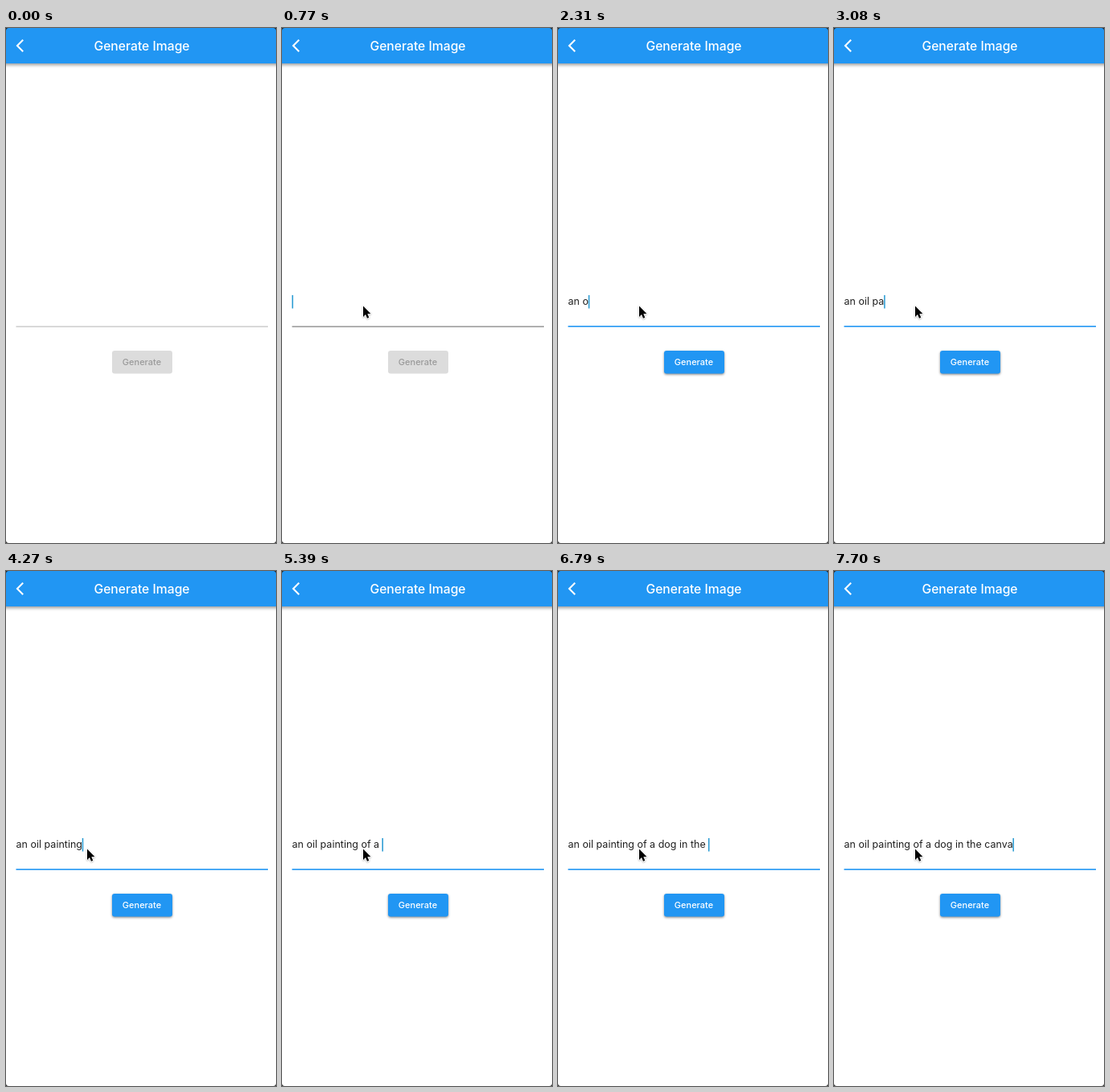
Write an HTML page with a canvas that moves like this. It is 336x640 px and loops after 8000 ms.

```html
<!DOCTYPE html>
<html lang="en">
<head>
<meta charset="utf-8">
<title>Generate Image</title>
<style>
html, body { margin: 0; width: 100%; height: 100%; overflow: hidden; background: #fff; }
canvas { display: block; width: 336px; height: 640px; }
</style>
</head>
<body>
<canvas id="stage"></canvas>
<script>
const W = 336, H = 640, LOOP = 8000, TICK = 70;
const BLUE = [33, 150, 243];
const FONT = 'Inter, Roboto, sans-serif';
const PROMPT = 'an oil painting of a dog in the canva';
const KEYS = [
  1540, 1820, 1960,
  2310, 2450, 2590, 2730, 2940, 3080,
  3640, 3780, 3850, 3990, 4130, 4270, 4410, 4550,
  5040, 5180, 5320, 5390,
  5670, 5810, 5950, 6020, 6160, 6300,
  6440, 6510, 6650, 6720, 6790,
  7140, 7210, 7350, 7630, 7700
];
const ARROW = [[0, 0], [0, 13.4], [3, 10.6], [5, 15.3], [7.3, 14.3], [5.3, 9.8], [9.4, 9.5]];

const canvas = document.getElementById('stage');
const ctx = canvas.getContext('2d');
const dpr = window.devicePixelRatio || 1;
canvas.width = W * dpr;
canvas.height = H * dpr;

const clamp = x => Math.max(0, Math.min(1, x));
const ramp = (t, from, span) => clamp((t - from) / span);
const lerp = (a, b, k) => a + (b - a) * k;
const mix = (a, b, k) => `rgb(${a.map((v, i) => Math.round(lerp(v, b[i], k))).join()})`;

function label(str, x, y, size, weight, color, align = 'left') {
  ctx.font = `${weight} ${size}px ${FONT}`;
  ctx.textAlign = align;
  ctx.fillStyle = color;
  ctx.fillText(str, x, y);
}

function withShadow(alpha, blur, dy, draw) {
  ctx.save();
  ctx.shadowColor = `rgba(0,0,0,${alpha})`;
  ctx.shadowBlur = blur * dpr;
  ctx.shadowOffsetY = dy * dpr;
  draw();
  ctx.restore();
}

function header() {
  ctx.fillStyle = mix(BLUE, BLUE, 0);
  withShadow(0.4, 4, 1.5, () => ctx.fillRect(-8, -8, W + 16, 52));
  ctx.strokeStyle = '#fff';
  ctx.lineWidth = 2.1;
  ctx.beginPath();
  ctx.moveTo(21.2, 14.8);
  ctx.lineTo(14, 22);
  ctx.lineTo(21.2, 29.2);
  ctx.stroke();
  label('Generate Image', 169, 27.5, 15.7, 500, '#fff', 'center');
}

function field(t) {
  const hover = ramp(t, 280, 140), focus = ramp(t, 770, 140);
  const idle = [186, 186, 186], dark = [112, 112, 112];
  ctx.fillStyle = focus ? mix(dark, BLUE, focus) : mix(idle, dark, hover);
  const thick = lerp(1.1, 1.6, focus);
  ctx.fillRect(12.5, 371.6 - thick, 313.5, thick);

  const typed = PROMPT.slice(0, KEYS.filter(k => k <= t).length);
  label(typed, 12.6, 344, 12.5, 400, '#222');
  const shown = t >= KEYS[0] ? 1 : t < 700 ? 0 : 1 - ramp(t, 1260, 140);
  ctx.globalAlpha = shown;
  ctx.fillStyle = '#2599d2';
  ctx.fillRect(12.4 + ctx.measureText(typed).width, 332, 1.5, 16.5);
  ctx.globalAlpha = 1;
}

function button(t) {
  const fill = ramp(t, 1470, 140), text = ramp(t, 1540, 210);
  ctx.fillStyle = mix([220, 220, 220], BLUE, fill);
  withShadow(0.45 * fill, 3, 1.2, () => {
    ctx.beginPath();
    ctx.roundRect(132, 401, 75, 28.5, 3.2);
    ctx.fill();
  });
  label('Generate', 169, 418.8, 11, 500, mix([154, 154, 154], [255, 255, 255], text), 'center');
}

function pointer(t) {
  if (t < 70) return;
  const k = 1 - (1 - ramp(t, 70, 490)) ** 2;
  ctx.save();
  ctx.translate(lerp(150, 101, k), lerp(459, 345.5, k));
  ctx.beginPath();
  ARROW.forEach(([x, y]) => ctx.lineTo(x, y));
  ctx.closePath();
  ctx.lineJoin = 'round';
  ctx.lineWidth = 1.6;
  ctx.strokeStyle = '#fff';
  withShadow(0.3, 2, 0.8, () => ctx.stroke());
  ctx.fillStyle = '#000';
  ctx.fill();
  ctx.restore();
}

// Dark slivers outside the rounded window
function corners() {
  ctx.fillStyle = '#222';
  ctx.beginPath();
  ctx.rect(0, 0, W, H);
  ctx.roundRect(0, 0, W, H, 3.5);
  ctx.fill('evenodd');
}

function render(t) {
  ctx.setTransform(dpr, 0, 0, dpr, 0, 0);
  ctx.fillStyle = '#fff';
  ctx.fillRect(0, 0, W, H);
  header();
  field(t);
  button(t);
  pointer(t);
  corners();
}

const start = performance.now();
function loop() {
  const t = (performance.now() - start) % LOOP;
  render(Math.floor(t / TICK) * TICK);
  requestAnimationFrame(loop);
}
loop();
</script>
</body>
</html>
```
